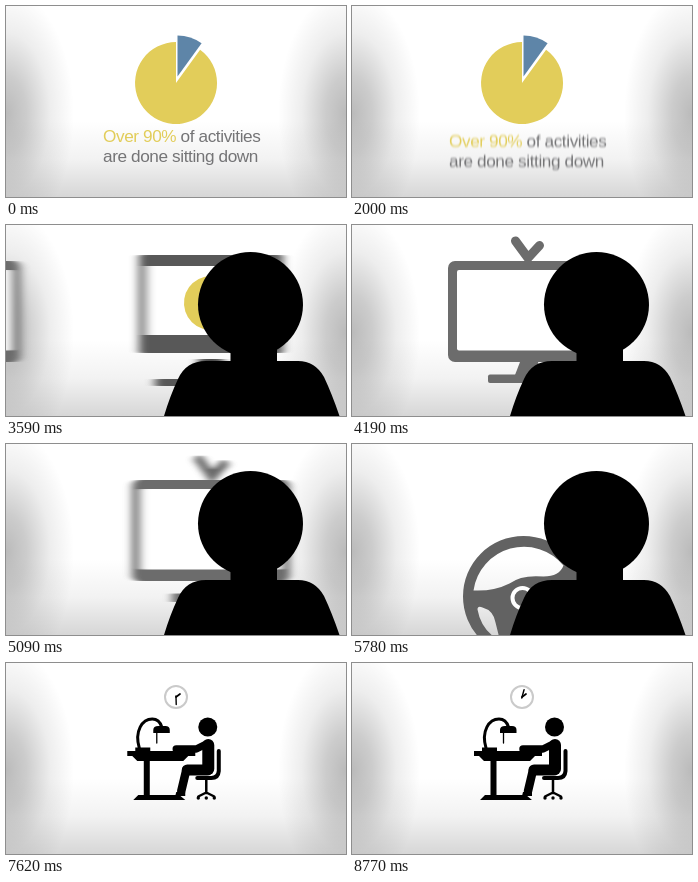
An HTML page that plays this animation: 340x191 px, repeating every 9 s.

```html
<!DOCTYPE html>
<html lang="en">
<head>
<meta charset="utf-8">
<title>Sitting down</title>
<style>
  html, body { margin: 0; width: 100%; height: 100%; overflow: hidden; background: #fff; }
  svg { display: block; width: 100vw; height: 100vh; }
  text { font: 17.2px "Liberation Sans", Arial, sans-serif; letter-spacing: -.4px; fill: #747476; }
  .yellow { fill: #e2cd5a; }
  .line { fill: none; stroke: #000; stroke-linecap: round; stroke-linejoin: round; }
</style>
</head>
<body>
<svg viewBox="0 0 340 191" preserveAspectRatio="none">
  <defs>
    <radialGradient id="shade">
      <stop offset="0" stop-opacity=".27"/>
      <stop offset=".3" stop-opacity=".2"/>
      <stop offset=".65" stop-opacity=".07"/>
      <stop offset="1" stop-opacity="0"/>
    </radialGradient>
    <linearGradient id="floor" x2="0" y2="1">
      <stop offset="0" stop-opacity="0"/>
      <stop offset=".5" stop-opacity=".05"/>
      <stop offset="1" stop-opacity=".16"/>
    </linearGradient>
    <filter id="smear" filterUnits="userSpaceOnUse" x="-100" y="-20" width="600" height="260">
      <feGaussianBlur id="smearBlur" stdDeviation="0 0"/>
    </filter>
    <filter id="fall" filterUnits="userSpaceOnUse" x="60" y="90" width="240" height="110">
      <feGaussianBlur id="fallBlur" stdDeviation="0 0"/>
    </filter>
  </defs>

  <rect width="340" height="191" fill="#fff"/>
  <rect y="115" width="340" height="76" fill="url(#floor)"/>
  <ellipse cy="108" rx="68" ry="125" fill="url(#shade)"/>
  <ellipse cx="340" cy="108" rx="68" ry="125" fill="url(#shade)"/>

  <g id="caption">
    <text x="97" y="136"><tspan class="yellow">Over 90%</tspan> of activities</text>
    <text x="97" y="156">are done sitting down</text>
  </g>

  <g id="monitor">
    <rect x="98" y="30" width="144" height="98" rx="3" fill="#585858"/>
    <rect x="106" y="41" width="128" height="69" fill="#fff"/>
    <path d="M158 134H182L186 155H154Z" fill="#4c4c4c"/>
    <rect x="114" y="154" width="112" height="7" rx="2" fill="#585858"/>
  </g>

  <g id="pie">
    <path class="yellow" d="M0 0V-41A41 41 0 1 0 24.1 -33.2Z"/>
    <path fill="#5e85a8" d="M1.5 -6.5V-47.5A41 41 0 0 1 25.6 -39.7Z"/>
  </g>

  <g id="tv" fill="#6c6c6c">
    <path d="M163.5 16L176 33L187.5 20.5" fill="none" stroke="#6c6c6c" stroke-width="9"
      stroke-linecap="round" stroke-linejoin="round"/>
    <rect x="96" y="36" width="158" height="101" rx="7"/>
    <rect x="105" y="45" width="140" height="80.5" rx="2" fill="#fff"/>
    <path d="M168 137H186L189 150H163Z"/>
    <rect x="136" y="149.5" width="78" height="8.5" rx="2"/>
  </g>

  <g id="wheel">
    <g id="rim" fill="#626262">
      <path fill-rule="evenodd" d="M-60.5 0A60.5 60.5 0 1 1 60.5 0A60.5 60.5 0 1 1 -60.5 0Z
        M-50 -6A51 51 0 0 1 40 -31Q36 -20 20 -20Q-2 -22 -14 -13Q-30 -5 -50 -6Z
        M-46 13Q-46 9 -41 11Q-30 14 -28 26L-25 38Q-25 42 -30 40Q-43 30 -46 13Z
        M46 13Q46 9 41 11Q30 14 28 26L25 38Q25 42 30 40Q43 30 46 13Z"/>
      <circle cx="-1" cy="1.5" r="10" stroke="#fff" stroke-width="4"/>
    </g>
  </g>

  <g id="viewer">
    <circle cx="244.5" cy="79.5" r="52.5"/>
    <path d="M224.5 120H271V136H292Q309 136 318 152Q326 169 333.500 191H158Q164 171 172 154Q180 136 200 136H224.5Z"/>
  </g>

  <g id="desk">
    <path d="M122 88H190V93H183L178 98H132L127 93H122ZM138.500 98H144.500V132H174L180 137H128L133 132H138.500Z"/>
    <path d="M130 84.500H145V88H130ZM148 70V67Q148 63 153 63H160Q164.500 63 164.500 67V70Z"/>
    <path class="line" stroke-width="3" d="M134 85C129 68 137 56 147 56Q154 56 156.500 64"/>
    <path class="line" stroke-width="1.300" d="M151.500 70V80"/>
  </g>

  <g id="sitter">
    <circle cx="202.500" cy="64" r="9.500"/>
    <path class="line" stroke-width="12" d="M203 82V106"/>
    <path class="line" stroke-width="7.500" d="M201 81L191 86H171"/>
    <path class="line" stroke-width="11" d="M202 107H182"/>
    <path class="line" stroke-width="8.500" d="M181 107L176 128"/>
    <path d="M171 129H180V133H170Z"/>
    <path class="line" stroke-width="4" d="M213.500 88V108Q213 115 206 115H192"/>
    <path class="line" stroke-width="2.500" d="M201 116V130M193 133.500L201 129.500L209 133.500"/>
    <g><circle cx="193" cy="135" r="1.700"/><circle cx="201" cy="135" r="1.700"/><circle cx="209" cy="135" r="1.700"/></g>
  </g>

  <g id="clock">
    <circle r="11" fill="#fff" stroke="#cacaca" stroke-width="2"/>
    <path class="line" stroke-width="1.700" d="M0 0L4 -3"/>
    <path id="minute" class="line" stroke-width="1.400" d="M0 1V-7.500"/>
  </g>
</svg>
<script>
  const LOOP = 9000;
  const part = Object.fromEntries([...document.querySelectorAll("[id]")].map(e => [e.id, e]));

  // The picture is held on a coarse beat that differs between sections.
  function beat(t) {
    const snap = (from, step) => from + Math.floor((t - from) / step) * step;
    if (t < 2000) return 0;
    if (t < 2690) return snap(2000, 230);
    if (t < 4190) return snap(2690, 300);
    if (t < 5090) return 4190;
    return snap(5090, 230);
  }

  // Linear interpolation through [time, value] keys.
  function track(t, ...keys) {
    if (t <= keys[0][0]) return keys[0][1];
    for (let i = 1; i < keys.length; i++) {
      const [t0, v0] = keys[i - 1], [t1, v1] = keys[i];
      if (t < t1) return v0 + (v1 - v0) * (t - t0) / (t1 - t0);
    }
    return keys[keys.length - 1][1];
  }

  function place(el, visible, x = 0, y = 0, scale = 1) {
    el.style.display = visible ? "" : "none";
    el.setAttribute("transform", `translate(${x} ${y}) scale(${scale})`);
  }

  function blur(el, filter, node, amount, value) {
    if (amount > 0) {
      node.setAttribute("stdDeviation", value);
      el.setAttribute("filter", `url(#${filter})`);
    } else el.removeAttribute("filter");
  }

  const GAP = 275;

  function draw(t) {
    const fall = track(t, [1770, 0], [2000, 4.5], [2230, 18], [2460, 70]);
    place(part.caption, t < 2460, 0, fall);
    part.caption.style.opacity = track(t, [2000, 1], [2230, .4]);
    const fallBlur = track(t, [1770, 0], [2000, 1.3], [2230, 4]);
    blur(part.caption, "fall", part.fallBlur, fallBlur, `${fallBlur / 2} ${fallBlur}`);

    // Screens and wheel travel rightwards on one belt.
    const belt = track(t, [2460, -280], [2690, -142], [2990, 0], [3290, 0], [3590, 35],
      [3890, 237], [4190, GAP], [4860, GAP], [5090, GAP + 30], [5320, GAP + 160],
      [5550, 2 * GAP - 30], [5780, 2 * GAP]);
    const speed = track(t, [2690, 7.5], [2990, 0], [3290, 0], [3590, 5], [3890, 6], [4190, 0],
      [4860, 0], [5090, 4], [5320, 8], [5550, 4], [5780, 0]);
    const exit = track(t, [6010, 0], [6240, 35], [6470, 195], [6700, 360]);

    place(part.monitor, t >= 2460 && t < 4190, belt);
    place(part.tv, t >= 3590 && t < 5780, belt - GAP);
    place(part.wheel, t >= 5090 && t < 6700, 171.5 + belt - 2 * GAP + exit, 152.5);
    for (const name of ["monitor", "tv", "wheel"])
      blur(part[name], "smear", part.smearBlur, speed, `${speed} 0`);
    part.rim.setAttribute("transform", `rotate(${track(t, [5320, 13], [5780, 0], [6240, -5])})`);

    const pieScale = track(t, [2000, 1], [2230, .9], [2460, .72], [2690, .66]);
    place(part.pie, t < 4190, 170 + Math.max(0, belt), track(t, [2000, 77], [2690, 78]), pieScale);

    const enter = track(t, [2000, 200], [2230, 150], [2460, 40], [2690, 0]);
    place(part.viewer, t >= 2230 && t < 6700, enter + exit);

    const grow = track(t, [6240, .5], [6470, .8], [6700, 1]);
    const drift = track(t, [6700, -1.3], [8770, 0]);
    place(part.desk, t >= 6470, 155 * (1 - grow) + drift, 137 * (1 - grow), grow);
    place(part.sitter, t >= 6930, drift + track(t, [6700, 150], [6930, 50], [7160, 0]));

    place(part.clock, t >= 6700, 170, 34, track(t, [6700, .3], [6930, .85], [7160, 1]));
    part.minute.setAttribute("transform", `rotate(${track(t, [6700, -340], [8770, 16])})`);
  }

  let shown = -1;
  function tick() {
    const t = beat(performance.now() % LOOP);
    if (t !== shown) draw(shown = t);
    requestAnimationFrame(tick);
  }
  tick();
</script>
</body>
</html>
```
